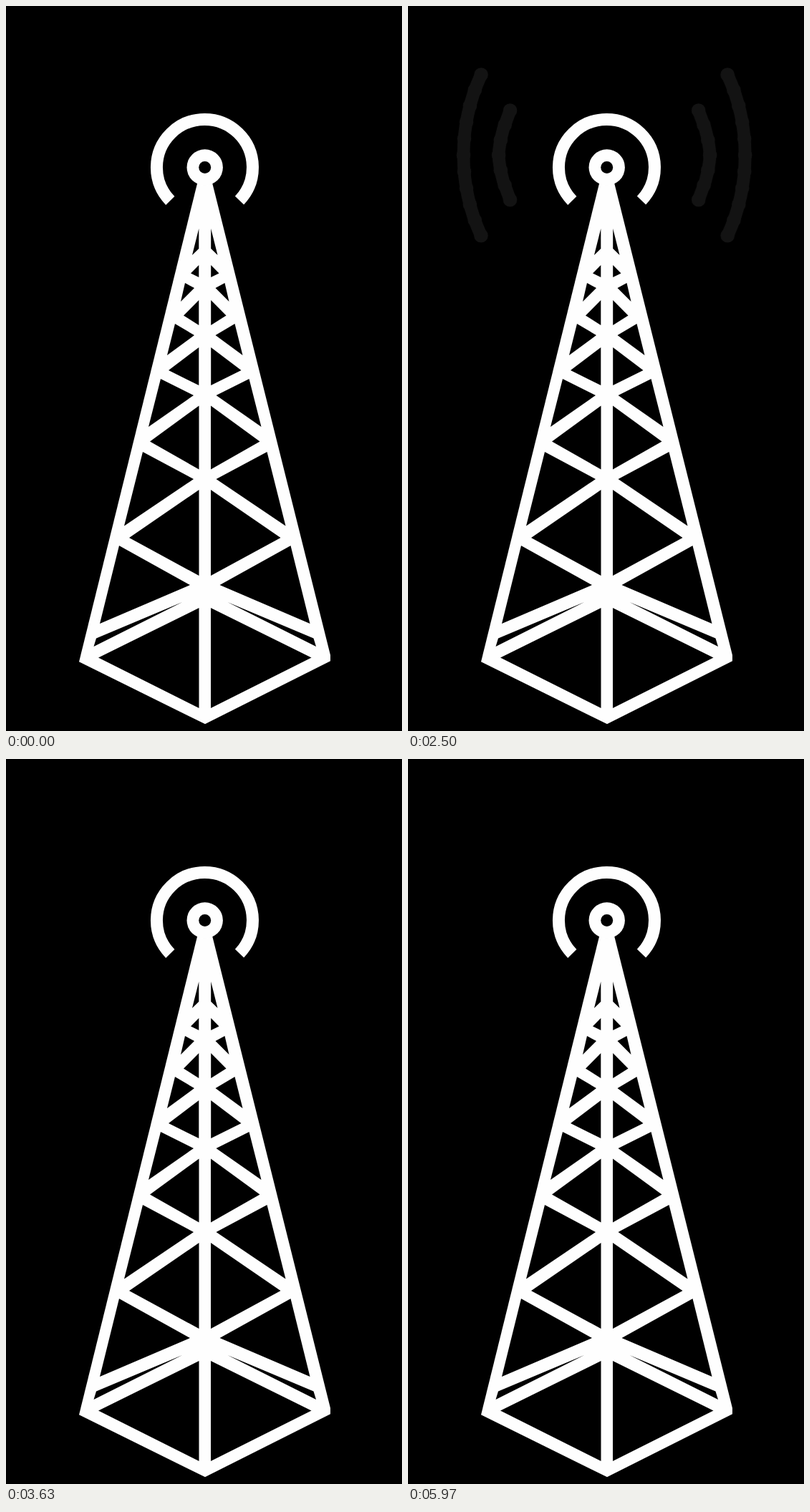
An HTML page for the animation above (6960 ms loop, 553 by 1013 pixels).

```html
<!DOCTYPE html>
<html lang="en">
<head>
<meta charset="utf-8">
<title>Radio tower</title>
<style>
  html, body { margin: 0; width: 100%; height: 100%; overflow: hidden; background: #000; }
  svg { display: block; width: 100%; height: 100%; }
  .ink { fill: #fefefe; }
  .line { fill: none; stroke: #fefefe; }
  .wave { stroke-linecap: round; stroke-linejoin: round; stroke-width: 17.8; }
  .bumps { stroke-width: 19.6; stroke-dasharray: 0 10; }
  .pulse { opacity: 0; animation: fade 6960ms linear infinite, drift 6960ms linear infinite; }

  /* three pulses per loop: fade in, short hold, fade out */
  @keyframes fade {
    0%, 1.8% { opacity: 0; }
    8.91%, 11.4% { opacity: 1; }
    18.67%, 35.4% { opacity: 0; }
    42.53%, 45% { opacity: 1; }
    52.15%, 68.9% { opacity: 0; }
    76.1%, 78.6% { opacity: 1; }
    85.77%, 100% { opacity: 0; }
  }
  /* the arcs creep outwards during each pulse and jump back unseen */
  @keyframes drift {
    0%, 1.8% { transform: translateX(3.3px); }
    18.67% { transform: translateX(-4px); }
    18.68%, 35.4% { transform: translateX(3.3px); }
    52.15% { transform: translateX(-4px); }
    52.16%, 68.9% { transform: translateX(3.3px); }
    85.77% { transform: translateX(-4px); }
    85.78%, 100% { transform: translateX(3.3px); }
  }
</style>
</head>
<body>
<svg viewBox="0 0 553 1013" preserveAspectRatio="none">
  <defs>
    <path id="gaps" d="
      M269.3 311V339L260 348Z
      M258 373.5L269.3 362V379Z
      M250 387L263 394L244 413Z
      M269.3 411V446L248 432.5Z
      M236 444L263 460L225 488Z
      M269.3 477V530L227 509Z
      M216 521L262 544L199 588Z
      M269.5 558.5V647.5L201 608.5Z
      M191 623L262 661L165 726.5Z
      M269.5 676V796L172 743Z
      M158 754L257 809L131 863Z
      M126 883.5L246 833L122.5 895Z
      M269.5 841V981L129 910.5Z"/>
    <path id="outer" pathLength="100.1" d="M99 96A270 270 0 0 0 99 321"/>
    <path id="inner" pathLength="60.1" d="M139.5 146L130 172Q124 194 123.5 208.5Q124 223 130 245L139.5 271"/>
    <g id="arcs" class="line wave">
      <use href="#outer"/><use href="#inner"/>
      <use href="#outer" class="bumps"/><use href="#inner" class="bumps"/>
    </g>
  </defs>

  <path class="ink" d="M267.3 247H288L453 907V915.3L278 1003.3L102 916.3Z"/>
  <use href="#gaps"/>
  <use href="#gaps" transform="matrix(-1 0 0 1 555.5 0)"/>

  <circle class="ink" cx="277.7" cy="225.5" r="25.2"/>
  <circle cx="277.7" cy="225.5" r="8.5"/>
  <path class="line" stroke-width="17" d="M229.3 272A67 67 0 1 1 326 271.6"/>

  <g class="pulse"><use href="#arcs"/></g>
  <g transform="matrix(-1 0 0 1 548.3 0)"><g class="pulse"><use href="#arcs"/></g></g>
</svg>
</body>
</html>
```
